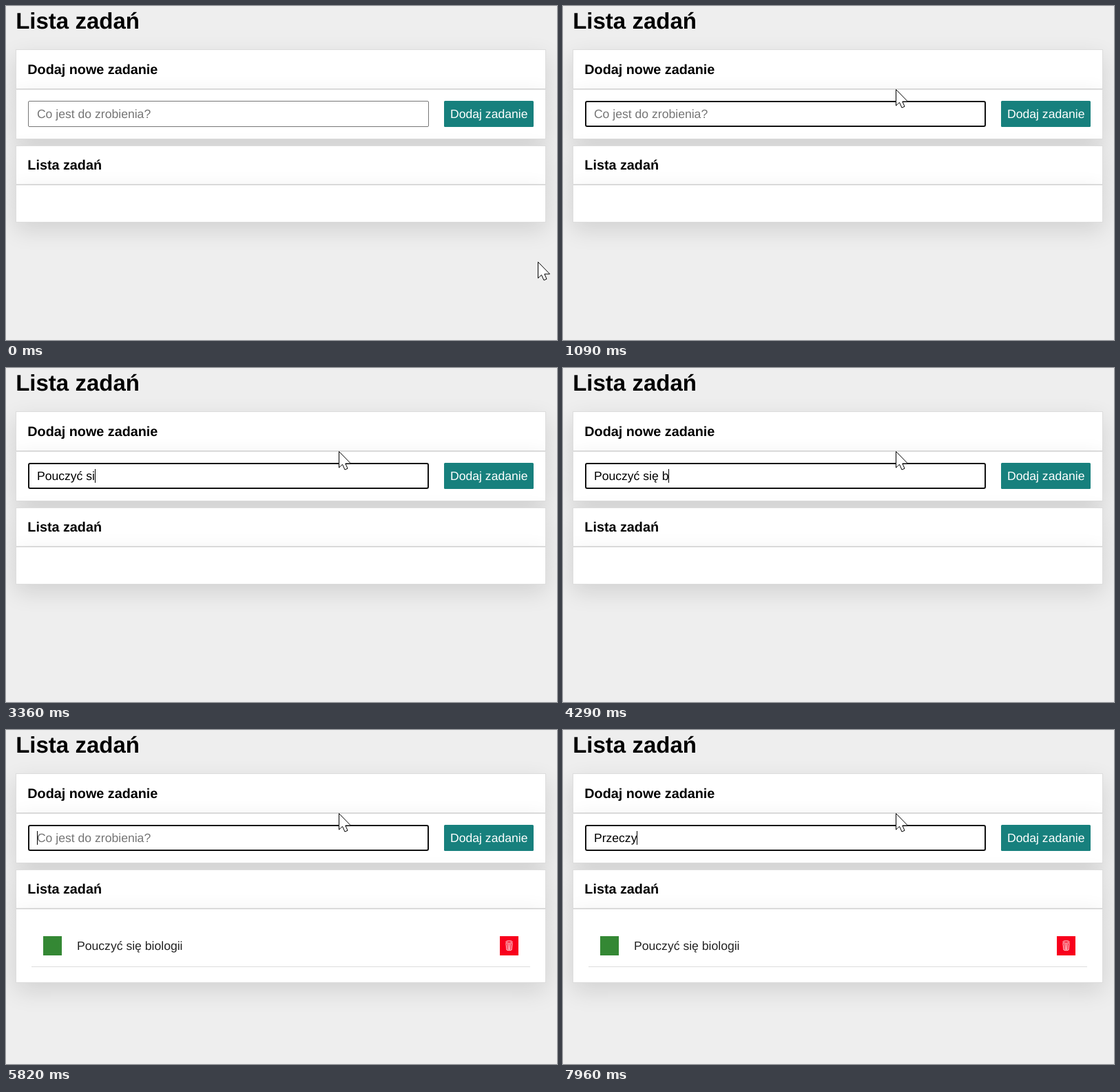
An HTML page that plays this animation: 800x486 px, repeating every 8000 ms.

```html
<!DOCTYPE html>
<html lang="pl">
<head>
<meta charset="utf-8">
<title>Lista zadań</title>
<style>
  html, body { margin: 0; width: 100%; height: 100%; overflow: hidden; background: #eee; }
  #stage { position: relative; width: 800px; height: 486px; overflow: hidden; background: #eee; }
  .card {
    position: absolute; left: 14px; width: 770px; box-sizing: border-box;
    background: #fff; border: 1px solid #ddd;
    box-shadow: 0 11px 33px rgba(0, 0, 0, .12);
  }
  svg { position: absolute; left: 0; top: 0; }
  text {
    font: 17.6px "Liberation Sans", Arial, sans-serif;
    white-space: pre; text-rendering: geometricPrecision;
  }
  .title { font-size: 33px; font-weight: bold; }
  .heading { font-size: 19.8px; font-weight: bold; }
</style>
</head>
<body>
<div id="stage">
  <div class="card" style="top:63px;height:58px"></div>
  <div class="card" style="top:121px;height:73px"></div>
  <div class="card" style="top:203px;height:57px"></div>
  <div class="card" id="list" style="top:260px;height:55px"></div>
  <svg width="800" height="486" viewBox="0 0 800 486">
    <text class="title" x="14.2" y="33">Lista zadań</text>
    <text class="heading" x="31.3" y="99">Dodaj nowe zadanie</text>
    <text class="heading" x="31.3" y="238">Lista zadań</text>

    <rect id="field" fill="#fff"/>
    <text id="placeholder" x="44.9" y="163" fill="#757575">Co jest do zrobienia?</text>
    <text id="typed" x="44.9" y="163"></text>
    <rect id="caret" y="147" width="1" height="20"/>

    <rect x="636" y="138" width="130" height="38" rx="1.5" fill="#17807d"/>
    <text x="645" y="163" fill="#fff">Dodaj zadanie</text>

    <g id="task">
      <rect x="54" y="300" width="27" height="28" fill="#348834"/>
      <text x="103" y="320" fill="#222">Pouczyć się biologii</text>
      <rect x="717" y="300" width="27" height="28" fill="#f8001c"/>
      <g fill="none" stroke="#fff">
        <ellipse cx="730.5" cy="308.5" rx="4.8" ry="1.6"/>
        <path d="M726 310l1 10q3.5 1.6 7 0l1-10M728.5 311l.5 8.5M730.5 311v9M732.5 311l-.5 8.5" stroke-width=".9"/>
      </g>
      <path d="M37 344.5H761" stroke="#ddd"/>
    </g>

    <path id="pointer" d="M.5.5V24L5.5 19.3 9 27 13 25.2 9.8 18H17.5Z" fill="#fff" stroke="#000"/>
  </svg>
</div>
<script>
const LOOP = 8000, FOCUS = 560, SUBMIT = 5820, STEP = 70;
const entries = [
  { text: "Pouczyć się biologii", from: 0,
    keys: [1220, 1490, 1750, 2030, 2150, 2420, 2820, 3100, 3230, 3360,
           3560, 3760, 4290, 4420, 4700, 4830, 5090, 5220, 5350, 5550] },
  { text: "Przeczy", from: SUBMIT,
    keys: [6420, 6740, 7010, 7270, 7480, 7690, 7960] }
];
const start = [772, 372], click = [494, 148], rest = [483, 121];

const el = id => document.getElementById(id);
const set = (id, attrs) => {
  for (const name in attrs) el(id).setAttribute(name, attrs[name]);
};
const show = (id, on) => set(id, { visibility: on ? "visible" : "hidden" });
const ease = p => p * p * (3 - 2 * p);
const mix = (a, b, p) => a.map((v, i) => Math.round(v + (b[i] - v) * p));

function pointerAt(t) {
  const step = Math.min(11, Math.floor(t / STEP));
  return step <= 8 ? mix(start, click, ease(step / 8)) : mix(click, rest, (step - 8) / 3);
}

function caretOn(t) {
  if (t < FOCUS) return false;
  return !(t >= 1090 && t < 1220) && !(t >= 6080 && t < 6420);
}

function drawField(focused) {
  const w = focused ? 2 : 1;
  set("field", {
    x: 32 + w / 2, y: 138 + w / 2, width: 582 - w, height: 38 - w,
    rx: focused ? 2 : 1.5, stroke: focused ? "#101010" : "#767676", "stroke-width": w
  });
}

function render(t) {
  const entry = entries[t < SUBMIT ? 0 : 1];
  const count = entry.keys.filter(key => key <= t).length;
  const typed = el("typed");
  typed.textContent = entry.text.slice(0, count);
  const width = count ? typed.getComputedTextLength() : 0;

  drawField(t >= FOCUS);
  show("placeholder", !count);
  set("caret", { x: Math.floor(45 + width - .05 * (count > 0)) });
  show("caret", caretOn(t));

  const added = t >= SUBMIT;
  show("task", added);
  el("list").style.height = (added ? 108 : 55) + "px";
  set("pointer", { transform: `translate(${pointerAt(t)})` });
}

const origin = performance.now();
function tick() {
  render((performance.now() - origin) % LOOP);
  requestAnimationFrame(tick);
}
tick();
</script>
</body>
</html>
```
